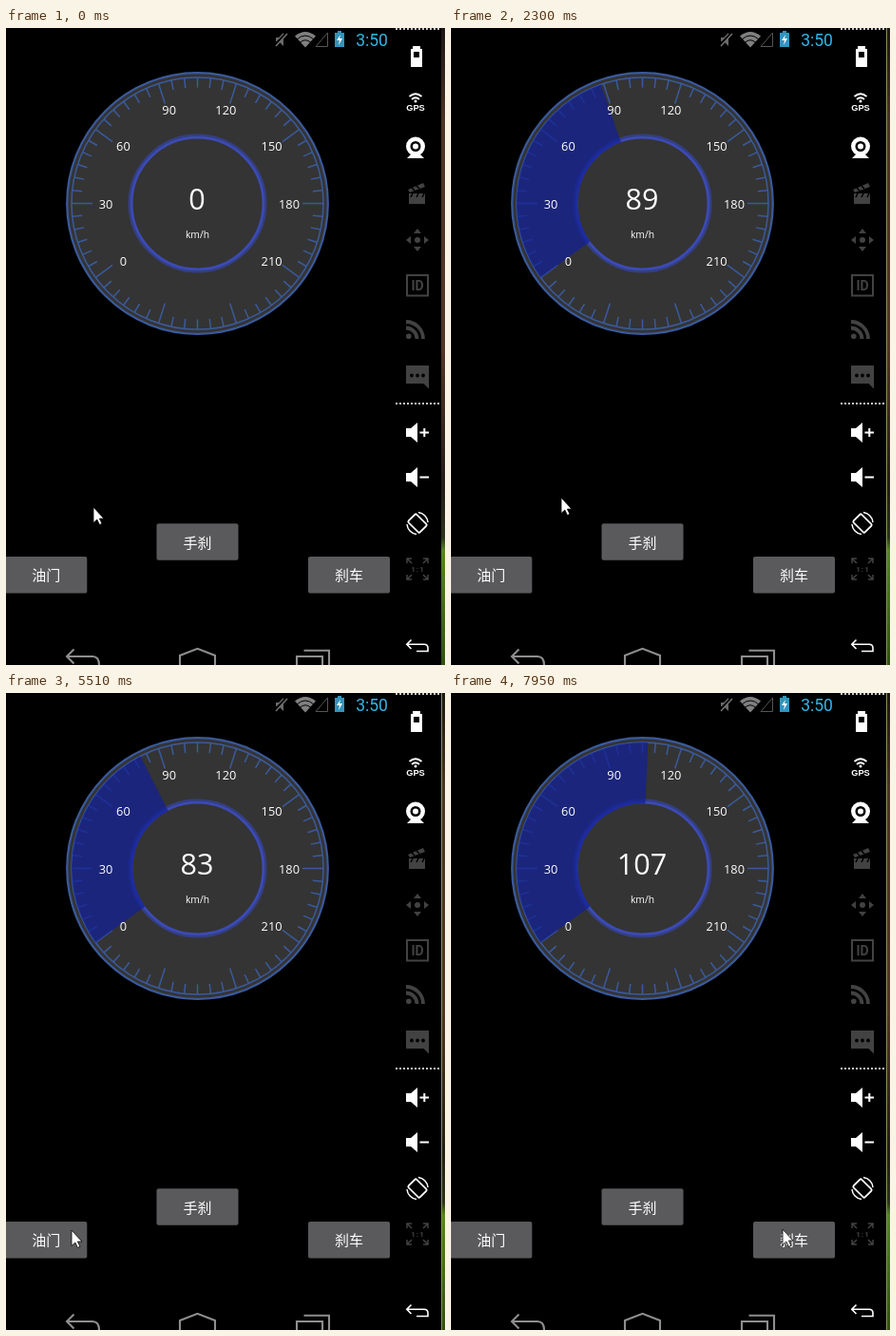
Animation of 462 by 670 pixels, one loop 8 s. Source, as an HTML page:

```html
<!DOCTYPE html>
<html lang="zh">
<head>
<meta charset="utf-8">
<title>Speedometer</title>
<style>
html, body { margin: 0; width: 100%; height: 100%; overflow: hidden; background: #000; }
svg { display: block; width: 462px; height: 670px; }
text { font-family: "Open Sans", "Noto Sans", sans-serif; fill: #fff; text-anchor: middle; }
.cjk { font: 15px "Noto Sans CJK SC", "Noto Sans CJK", sans-serif; }
.line { fill: none; stroke: #fff; }
.dim { fill: none; stroke: #424242; }
</style>
</head>
<body>
<svg viewBox="0 0 462 670">
  <defs>
    <linearGradient id="photo" x1="0" y1="0" x2="0" y2="1">
      <stop offset="0" stop-color="#1c1512"/>
      <stop offset=".15" stop-color="#4c3426"/>
      <stop offset=".5" stop-color="#523526"/>
      <stop offset=".72" stop-color="#241c17"/>
      <stop offset=".8" stop-color="#2c331c"/>
      <stop offset=".82" stop-color="#56861c"/>
      <stop offset="1" stop-color="#31500f"/>
    </linearGradient>
  </defs>
  <rect width="462" height="670"/>

  <!-- Desktop strip and window edge -->
  <rect x="458" width="4" height="670" fill="url(#photo)"/>
  <rect id="edge" x="458" width="1" height="670" fill="#82945a"/>

  <!-- Status bar -->
  <path d="M284 10h3l5-5v14l-5-5h-3z" fill="#6a6a6a"/>
  <path d="M283 18L296 5" stroke="#000" stroke-width="3"/>
  <path d="M284 19L296 6" stroke="#777" stroke-width="1.4"/>
  <path d="M304 8.500Q315 -.5 326 8.500L315 20.500z" fill="#808080"/>
  <path d="M306 12Q315 4 324 12M309 15.500Q315 10 321 15.500" fill="none" stroke="#000"/>
  <path d="M326 19.500H338.500V5z" fill="none" stroke="#555"/>
  <path d="M349 3h4v2h3v15h-10V5h3z" fill="#3394bd"/>
  <path d="M352 7l-4 6h3l-1 5 4-7h-3z" fill="#fff"/>
  <text x="385" y="18.500" style="font:17.500px Roboto,sans-serif;fill:#33b5e5">3:50</text>

  <!-- Dial -->
  <g fill="none" stroke="#3a5a9c">
    <circle cx="201.500" cy="184.500" r="137.300" fill="#343434" stroke-width="2.200"/>
    <circle cx="201.500" cy="184.500" r="132.500" stroke-width="1.500"/>
    <path id="ticks" stroke-width="1.500"/>
    <circle cx="201.500" cy="184.500" r="71" stroke="#343f83" stroke-width="4"/>
    <circle cx="201.500" cy="184.500" r="69.300" stroke="#3c4bb6" stroke-width="2.600"/>
    <path id="wedge" fill="#122198" fill-opacity=".72" stroke="none"/>
  </g>
  <g id="labels" font-size="12.800"></g>
  <text id="speed" x="201" y="191" font-size="30.500">0</text>
  <text x="201.500" y="220.500" font-size="10.300">km/h</text>

  <!-- Pedal buttons -->
  <g id="buttons"></g>

  <!-- Navigation bar -->
  <g fill="none" stroke="#8e8e8e" stroke-width="2.100">
    <path d="M71.500 653.500L64 661L71.500 668.500M65 661H91Q98 661 98 670"/>
    <path d="M183 671V660L201.500 652.800L220 660V671"/>
    <path d="M313.500 654.800H340V670M306 671V661H333V671"/>
  </g>

  <!-- Tool bar -->
  <path d="M410 1H456M410 395H456" stroke="#c8c8c8" stroke-width="2" stroke-dasharray="2 2"/>
  <g fill="#fff">
    <path d="M428 19h8v3h2v19h-12V22h2z"/>
    <path d="M429 25h6v6h-6z" fill="#000"/>
    <path class="line" d="M424.500 72Q431 66.500 437.500 72M427 75Q431 71.500 435 75" stroke-width="1.700"/>
    <circle cx="431" cy="77" r="1.500"/>
    <text x="431" y="86.500" style="font:bold 9.300px 'Liberation Sans',sans-serif">GPS</text>
    <circle cx="431" cy="124.500" r="10"/>
    <circle cx="431" cy="124.500" r="5.500" fill="#000"/>
    <circle cx="431" cy="124.500" r="3"/>
    <path d="M426 133h10l4 4h-18z"/>
    <path d="M421 421h5l7-6v21l-7-6h-5zM421 468h5l7-6v21l-7-6h-5z"/>
    <path class="line" d="M435.500 425.500H445M440.300 421V430M435.500 472.500H445" stroke-width="2"/>
  </g>
  <g fill="#424242">
    <path d="M424 174h17v11h-17zM423 170l16-7 2 4-16 6z"/>
    <path d="M427 168l3 3M432 166l3 3M428 174l-2 4M434 174l-2 4M440 174l-2 4" stroke="#000" stroke-width="1.500"/>
    <circle cx="433" cy="223" r="3"/>
    <path d="M433 211l4 5h-8zM433 235l4-5h-8zM421 223l5-4v8zM445 223l-5-4v8z"/>
    <rect class="dim" x="422" y="260" width="22" height="21.500" stroke-width="2"/>
    <text x="433" y="276" style="font:bold 14px Roboto,sans-serif;fill:#424242">ID</text>
    <circle cx="423.800" cy="324.200" r="2.800"/>
    <path class="dim" d="M421 315.500A11.500 11.500 0 0 1 432.500 327M421 309A18 18 0 0 1 439 327" stroke-width="3.800"/>
    <path d="M421 355h24v24.500l-5.500-5.500h-18.500z"/>
    <path d="M427 365.500h.01M433 365.500h.01M439 365.500h.01" stroke="#000" stroke-width="3.800" stroke-linecap="round"/>
  </g>
  <rect class="line" x="427" y="512.500" width="12" height="17" rx="1.500" transform="rotate(-45 433 521)" stroke-width="1.800"/>
  <path class="line" d="M434 509.500A11.500 11.500 0 0 1 444 520M432 532.500A11.500 11.500 0 0 1 422 522" stroke-width="1.500"/>
  <path class="dim" d="M422 563v-5h5m-5 0l5 5M444 563v-5h-5m5 0l-5 5M422 575v5h5m-5 0l5-5M444 575v5h-5m5 0l-5-5" stroke-width="1.500"/>
  <text x="433.500" y="572" style="font:bold 8px Roboto,sans-serif;fill:#424242;letter-spacing:1px">1:1</text>
  <path class="line" d="M426.500 643.500L421.800 648.300L426.500 653M422 648.300H440Q444 648.300 444 652V655.500H432" stroke-width="1.600"/>

  <path id="cursor" d="M0 0V16.500L3.800 13L6.500 18.500L9 17.300L6.400 12H11z" fill="#fff" stroke="#000" stroke-width=".8"/>
</svg>
<script>
const LOOP = 8000, REFRESH = 84.5;
const CX = 201.5, CY = 184.5;
const ZERO = 144, PER_KMH = 1.2; // dial angles in degrees
const $ = id => document.getElementById(id);

// [time, km/h]: throttle, coast, handbrake, throttle, coast
const drive = [
  [0, 0], [660, 0], [1521, 60], [2030, 94], [2960, 75], [3210, 0],
  [4150, 0], [4647, 27], [6337, 138], [LOOP, 106]
];

// [time, x, y]
const pointer = [
  [0, 92, 504], [600, 61, 565], [1860, 60, 565], [2030, 36, 545], [2280, 116, 494],
  [2960, 217, 535], [3400, 217, 535], [3900, 69, 565], [6250, 69, 565],
  [6337, 99, 438], [7700, 349, 564], [LOOP, 349, 564]
];

function sample(keys, t) {
  const i = keys.findIndex(key => key[0] > t);
  const [from, ...a] = keys[i - 1], [to, ...b] = keys[i];
  return a.map((v, j) => v + (b[j] - v) * (t - from) / (to - from));
}

function polar(rx, deg, ry = rx) {
  const a = deg * Math.PI / 180;
  return [CX + rx * Math.cos(a), CY + ry * Math.sin(a)];
}

function sector(speed) {
  if (speed <= 0) return "";
  const end = ZERO + speed * PER_KMH, large = speed * PER_KMH > 180 ? 1 : 0;
  return `M${polar(132.5, ZERO)}A132.5 132.5 0 ${large} 1 ${polar(132.5, end)}` +
    `L${polar(68, end)}A68 68 0 ${large} 0 ${polar(68, ZERO)}Z`;
}

function build() {
  let ticks = "", labels = "";
  for (let deg = 0; deg < 360; deg += 6)
    ticks += `M${polar(132.5, deg)}L${polar(deg % 36 ? 122 : 110.5, deg)}`;
  for (let v = 0; v <= 210; v += 30) {
    const [x, y] = polar(96.5, ZERO + v * PER_KMH, 103.5);
    labels += `<text x="${x}" y="${y + 5}">${v}</text>`;
  }
  $("ticks").setAttribute("d", ticks);
  $("labels").innerHTML = labels;
  $("buttons").innerHTML = button("手刹", 158.5, 521.3) + button("油门", -0.7, 556) + button("刹车", 318, 556);
}

function button(name, x, y) {
  return `<rect x="${x}" y="${y}" width="86" height="38.5" rx="2" fill="#5a5a5c"/>` +
    `<text class="cjk" x="${x + 43}" y="${y + 25.3}">${name}</text>`;
}

function draw(time) {
  const t = Math.floor(time / REFRESH) * REFRESH;
  const [speed] = sample(drive, t);
  const [x, y] = sample(pointer, t).map(Math.round);
  $("wedge").setAttribute("d", sector(speed));
  $("speed").textContent = Math.round(speed);
  $("cursor").setAttribute("transform", `translate(${x} ${y})`);
  $("edge").setAttribute("visibility", t > 0 ? "visible" : "hidden");
}

build();
const start = performance.now();
function tick() {
  draw((performance.now() - start) % LOOP);
  requestAnimationFrame(tick);
}
tick();
</script>
</body>
</html>
```
